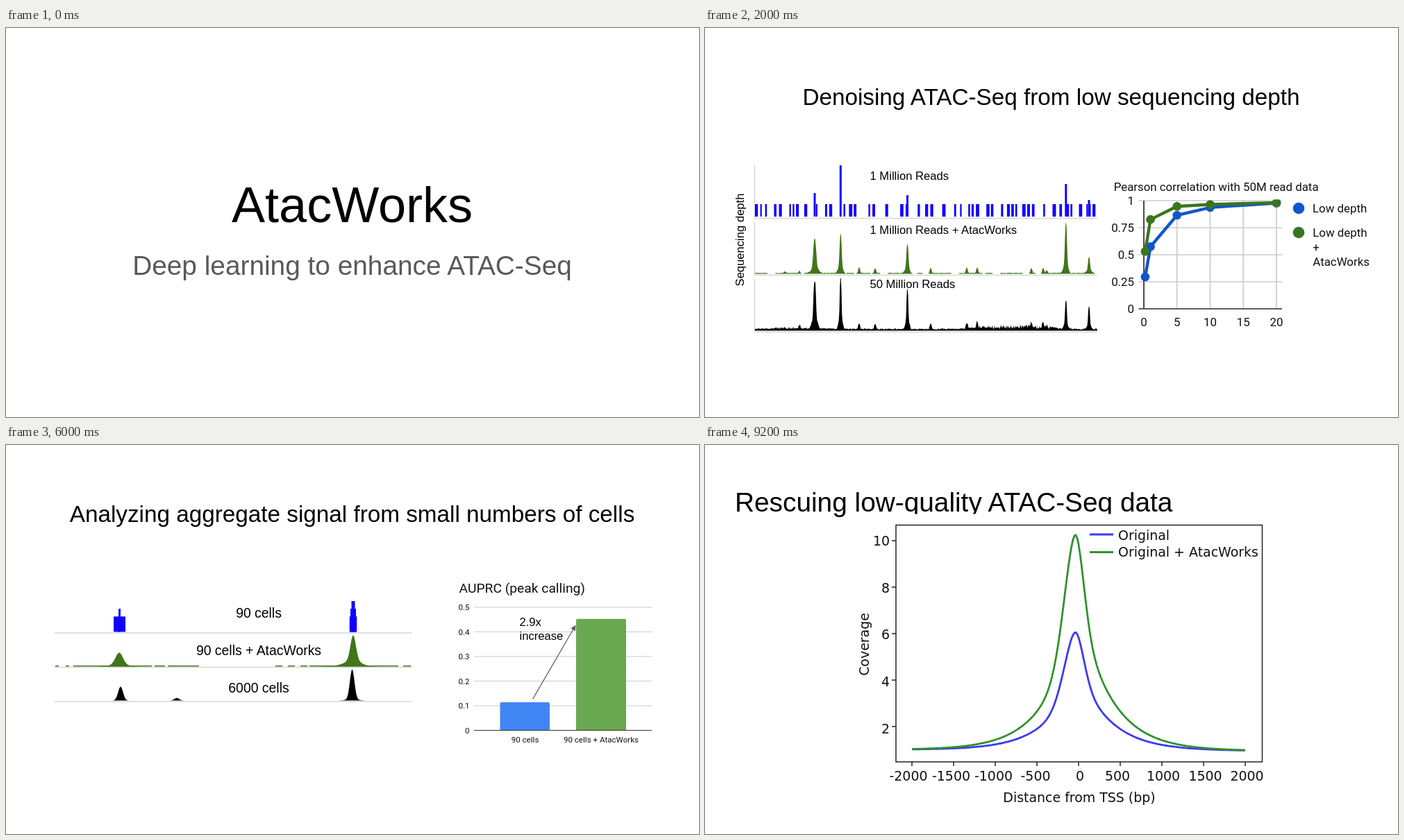
These frames come from a looping animation (998x561 px, 10 s). An HTML page:

```html
<!DOCTYPE html>
<html lang="en">
<head>
<meta charset="utf-8">
<title>AtacWorks</title>
<style>
html, body { margin: 0; width: 100%; height: 100%; overflow: hidden; background: #fff; }
svg { display: block; width: 998px; height: 561px; }
.arial { font-family: "Liberation Sans", Arial, sans-serif; }
.roboto { font-family: Roboto, sans-serif; }
.dejavu { font-family: "DejaVu Sans", sans-serif; }
</style>
</head>
<body>
<svg id="stage" viewBox="0 0 998 561" xmlns="http://www.w3.org/2000/svg"></svg>
<script>
const HOLD = 2000;
const BLUE = '#1100ff', GREEN = '#41751a', BLACK = '#000', RED = '#cc1a27';
const GRID = '#ccc', RULE = '#d6d8d8', AXIS = '#333', INK = '#111';
const DEPTHS = [0.2, 1, 5, 10, 20];

const tag = (name, attrs, body = '') =>
  `<${name} ${Object.entries(attrs).map(([k, v]) => `${k}="${v}"`).join(' ')}>${body}</${name}>`;
const rect = (x, y, w, h, fill, more = {}) => tag('rect', { x, y, width: w, height: h, fill, ...more });
const line = (x1, y1, x2, y2, stroke, width = 1.5, dash = 'none') =>
  tag('line', { x1, y1, x2, y2, stroke, 'stroke-width': width, 'stroke-dasharray': dash });
const dot = (cx, cy, r, fill) => tag('circle', { cx, cy, r, fill });
const write = (family, size, fill = INK) => (str, x, y, anchor = 'start', more = {}) =>
  tag('text', { class: family, x, y, 'font-size': size, fill, 'text-anchor': anchor, ...more }, str);
const turned = (x, y) => ({ transform: `translate(${x} ${y}) rotate(-90)` });
const each = (list, fn) => list.map(fn).join('');

const bigTitle = write('arial', 38.81, '#000');
const label = write('arial', 16.63, '#000');
const cellLabel = write('arial', 19.4, '#000');
const heading = str => write('arial', 33.27, '#000')(str, 498.5, 110.5, 'middle');

function seeded(seed) {
  return () => (seed = (seed * 16807) % 2147483647) / 2147483647;
}

// Filled signal: sum of peaks [centre, height, width] over a floor; a higher power flattens the tops.
function track(base, x0, x1, peaks, fill, { floor = () => 0, power = 2, step = 1 } = {}) {
  let d = `M${x0} ${base}`;
  for (let x = x0; x <= x1; x += step) {
    const h = peaks.reduce((sum, [c, top, w]) => sum + top * Math.exp(-(Math.abs((x - c) / w) ** power)), floor(x));
    d += `L${x} ${(base - h).toFixed(2)}`;
  }
  return tag('path', { d: d + `L${x1} ${base}Z`, fill });
}

// A narrow peak standing on a wider foot.
const spire = ([c, h, w]) => [[c, h * 0.8, w], [c, h * 0.2, w * 2.4]];

// Stacked blocks, one read count per level, centred on x.
const tower = (x, base, unit, widths) => each(widths, (w, i) =>
  rect(x - w / 2, base - unit * (i + 2), w, unit * (i + 2), BLUE));

// Line chart over sequencing depth 0..20.
function lineChart({ x0, xScale, yTop, yBase, yMax, yLabels, right, xText, yText, xDrop, yGap, r, sets }) {
  const px = v => x0 + v * xScale;
  const py = v => yBase - (v / yMax) * (yBase - yTop);
  const left = x0 - 7.5;
  const rows = yLabels.map((str, i) => [str, yTop + i * (yBase - yTop) / (yLabels.length - 1)]);
  return each(rows, ([str, y]) => line(left, y, right, y, GRID, 1.7) + yText(str, left - yGap, y + 5.8, 'end')) +
    each([0, 5, 10, 15, 20], v => line(px(v), yTop, px(v), yBase, GRID, 1.7) + xText(v, px(v), yBase + xDrop, 'middle')) +
    line(x0, yTop, x0, yBase, AXIS, 1.7) + line(left, yBase, right, yBase, AXIS, 1.7) +
    tag('svg', { y: yTop - 1.5, viewBox: `0 ${yTop - 1.5} 998 561`, width: 998, height: 561 },
      each(sets, ([color, values]) => {
        const points = values.map((v, i) => [px(DEPTHS[i]), py(v)]);
        return tag('polyline', { points: points.join(' '), fill: 'none', stroke: color, 'stroke-width': 4.4 }) +
          each(points, ([x, y]) => dot(x, y, r, color));
      }));
}

function titleSlide() {
  return write('arial', 72.08, '#000')('AtacWorks', 498.5, 280, 'middle') +
    write('arial', 38.81, '#595959')('Deep learning to enhance ATAC-Seq', 498.5, 356, 'middle');
}

// Sparse reads of equal height, scattered along the genome.
function scatteredReads(rand) {
  let out = '';
  for (let x = 72; x < 560;) {
    const w = 2 + rand() * 3;
    out += rect(x, 254, w, 18, BLUE);
    x += w + 2 + rand() ** 2 * 16;
  }
  return out;
}

function denoising() {
  const text = write('roboto', 16.85);
  const rand = seeded(41);
  const sites = [158, 195.3, 291.5, 519.8, 553];
  const peaks = (heights, width) => sites.map((x, i) => [x, heights[i], i ? width : width * 1.4]).flatMap(spire);
  const bumps = [115, 136, 222, 245, 325, 377, 392, 470, 487, 492].map(x => [x, 2 + rand() * 6, 1.8]);
  const greenFloor = x => (Math.sin(x * 0.31) + Math.sin(x * 0.117) > -0.6 ? 0.8 + rand() * 0.9 : 0);
  const hill = x => Math.exp(-(((x - 445) / 65) ** 4)) + 0.5 * Math.exp(-(((x - 130) / 45) ** 2));
  const blackFloor = x => 1.5 + rand() * 2 + hill(x) * (1 + 5 * rand() ** 2);

  return heading('Denoising ATAC-Seq from low sequencing depth') +
    each([274.5, 356.5, 438.5], y => line(71.5, y - 76, 71.5, y, '#c4c4c4', 1) + line(71, y, 565, y, RULE)) +
    scatteredReads(rand) +
    each([34, 74, 31, 47, 24], (h, i) => rect(sites[i] - 1.5, 272 - h, 3, h, BLUE)) +
    track(354.5, 72, 565, [...peaks([51, 58, 42, 74, 23], 1.9), ...bumps], GREEN,
      { floor: greenFloor, power: 2.5, step: 0.5 }) +
    track(436.5, 72, 565, [...peaks([68, 74, 58, 41, 32], 1.6), ...bumps], BLACK,
      { floor: blackFloor, power: 3.5, step: 0.75 }) +
    label('1 Million Reads', 237.5, 219) +
    label('1 Million Reads + AtacWorks', 237.5, 297) +
    label('50 Million Reads', 237.5, 375) +
    label('Sequencing depth', 0, 0, 'middle', turned(56, 305.5)) +
    text('Pearson correlation with 50M read data', 588.7, 235) +
    lineChart({
      x0: 632, xScale: 9.55, yTop: 249, yBase: 405, yMax: 1, yLabels: ['1', '0.75', '0.5', '0.25', '0'],
      right: 831, xText: text, yText: text, xDrop: 25, yGap: 6.5, r: 6.3,
      sets: [['#1155cc', [0.295, 0.575, 0.865, 0.937, 0.978]], ['#38761d', [0.53, 0.826, 0.947, 0.965, 0.981]]]
    }) +
    dot(855, 260, 8.3, '#1155cc') + dot(855, 295, 8.3, '#38761d') +
    text('Low depth', 875, 266) +
    each(['Low depth', '+', 'AtacWorks'], (str, i) => text(str, 875.3, 301 + i * 20.8));
}

function peakCalling() {
  const text = write('roboto', 18.4);
  const green = [[709.5, 37, 8.5], [727, 36, 8], [718, 9, 24], [819, 18, 9], [566, 2, 6], [670, 2.2, 18], [875, 1.8, 12]];
  const black = [[717, 41, 7.5], [706, 20, 6], [728, 12, 5], [748, 23, 9], [681, 8, 9]];
  const ripples = [540, 567, 592, 616, 638].map((x, i) => [x, i % 2 ? 8 : 5, 8]);
  const minor = [[817, 4.5, 6], [858, 6, 9], [887, 4.5, 9]];

  return heading('Better peak calling from low sequencing depth') +
    write('roboto', 27.3)('AUPRC (Peak calling)', 62.5, 215.5) +
    lineChart({
      x0: 103, xScale: 12.55, yTop: 237.5, yBase: 426, yMax: 0.8, yLabels: ['0.8', '0.6', '0.4', '0.2', '0'],
      right: 364, xText: text, yText: write('roboto', 15.6), xDrop: 27, yGap: 7, r: 6.9,
      sets: [['#1155cc', [0.034, 0.098, 0.278, 0.412, 0.586]], ['#6aa84f', [0.14, 0.312, 0.505, 0.607, 0.737]]]
    }) +
    dot(393, 249, 9, '#1155cc') + dot(393, 287, 9, '#6aa84f') +
    text('MACS2', 413.5, 255.5) + text('AtacWorks', 414, 293) +
    text('Sequencing Depth (x million', 229, 497.5, 'middle', { 'font-style': 'italic' }) +
    each([275, 291.5, 347.5, 364, 418.5, 436], y => line(528, y, 953, y, RULE)) +
    tower(709.5, 272.5, 12.1, [20, 9, 4.5]) + tower(726.5, 272.5, 12.1, [21, 15, 5.5]) +
    tower(819.5, 272.5, 12.1, [19, 13, 6.5]) +
    track(345.5, 528, 953, green, GREEN, { floor: () => 1.8 }) +
    rect(708, 349, 25, 12.5, RED) + rect(699.5, 421.5, 32.5, 12.5, RED) +
    track(417, 528, 764, [...black, ...ripples], BLACK, { floor: () => 0.7 }) +
    track(417, 806, 902, minor, BLACK, { floor: () => 0.6 }) +
    each([772, 928], x => rect(x, 416, 25, 1, BLACK)) +
    label('1 Million Reads', 524.5, 242) + label('1 Million Reads +', 524.5, 310) +
    label('AtacWorks', 524.5, 333) + label('50 Million Reads', 524.5, 402);
}

function smallCells() {
  const text = write('roboto', 11.6);
  const green = [[163, 17, 7.5], [163, 3, 16], [500, 36, 5.5], [500, 8, 15], [490, 1.5, 26]];
  const black = [[165, 20, 5], [246, 3.7, 5], [498.5, 43, 4.6], [498.5, 2, 11]];
  const barLabels = ['90 cells', '90 cells + AtacWorks'];
  return heading('Analyzing aggregate signal from small numbers of cells') +
    each([271, 320.5, 370], y => line(70, y, 585, y, RULE)) +
    tower(163.5, 269.5, 11.1, [17, 3]) + tower(500, 269.5, 11.1, [10.5, 8, 5]) +
    line(71, 318.7, 97, 318.7, GREEN, 1.5, '5 10') + line(97, 318.7, 278, 318.7, GREEN, 1.5, '113 4 15 4') +
    line(388, 318.7, 437, 318.7, GREEN, 1.5, '10 8') + line(437, 318.7, 583, 318.7, GREEN, 1.5, '128 7') +
    track(319.5, 110, 562, green, GREEN) + track(368.5, 140, 520, black, BLACK) +
    each(['90 cells', '90 cells + AtacWorks', '6000 cells'], (str, i) => cellLabel(str, 364, 249 + i * 54.2, 'middle')) +
    write('roboto', 19.25)('AUPRC (peak calling)', 652.5, 213) +
    each(['0.5', '0.4', '0.3', '0.2', '0.1', '0'], (str, i) => {
      const y = 234 + i * 35.5;
      return line(674, y, 930, y, GRID, 1.2) + text(str, 667.5, y + 4.2, 'end');
    }) +
    rect(711.5, 371, 71.5, 42, '#4285f4', { rx: 2 }) + rect(821, 250.8, 72, 162, '#6aa84f', { rx: 2 }) +
    rect(705, 411.5, 195, 3, '#fff') + line(674, 411.5, 930, 411.5, AXIS, 1.2) +
    each(barLabels, (str, i) => text(str, 747.5 + i * 109.5, 429, 'middle')) +
    line(758.5, 366.5, 818, 264, '#595959', 1.2) +
    tag('path', { d: 'M820 260.5L819.5 267.5L814.2 264.4Z', fill: '#595959', stroke: '#595959' }) +
    label('2.9x', 739.5, 261) + label('increase', 739.5, 281);
}

// Coverage around the start site: a narrow core on long exponential tails, steeper on the right.
function coverage(height, stroke) {
  const points = [];
  for (let x = 298; x <= 778; x += 2) {
    const dx = x - 533.5;
    const [share, core] = dx < 0 ? [0.54, 23] : [0.67, 17];
    const tail = Math.exp((6 - Math.hypot(dx, 6)) / 45);
    const shape = share * tail + (1 - share) * Math.exp(-((dx / core) ** 2));
    points.push(`${x},${(440.2 + dx / 300 - height * shape).toFixed(2)}`);
  }
  return tag('polyline', { points: points.join(' '), fill: 'none', stroke, 'stroke-width': 2.8 });
}

function rescuing() {
  const text = write('dejavu', 18.95);
  const blue = '#3a3af5', green = '#2f922f';
  const labelX = [293, 354.5, 415.5, 476, 540, 594, 660, 720.5, 780.5];
  return bigTitle('Rescuing low-quality ATAC-Seq data', 43, 95.5) +
    rect(213, 99.5, 600, 425, '#fff') +
    coverage(170, blue) + coverage(310.5, green) +
    rect(275, 115.5, 527.5, 341.5, 'none', { stroke: '#222', 'stroke-width': 1.5 }) +
    each(labelX, (x, i) => line(298 + i * 60, 457, 298 + i * 60, 463, '#222') +
      text((i - 4) * 500, x, 483.5, 'middle')) +
    each([10, 8, 6, 4, 2], (v, i) => line(269, 138 + i * 67, 275, 138 + i * 67, '#222') +
      text(v, 266, 145 + i * 67.7, 'end')) +
    text('Distance from TSS (bp)', 539, 515, 'middle') +
    text('Coverage', 0, 0, 'middle', turned(236, 287.5)) +
    each([['Original', blue], ['Original + AtacWorks', green]], ([str, color], i) =>
      line(554, 129 + i * 25.5, 588, 129 + i * 25.5, color, 3) + text(str, 595, 136.5 + i * 24));
}

const stage = document.getElementById('stage');
stage.innerHTML = each([titleSlide, denoising, peakCalling, smallCells, rescuing], slide => tag('g', {}, slide()));
const slides = [...stage.children];

function show(time) {
  const current = Math.floor(time / HOLD) % slides.length;
  slides.forEach((slide, i) => { slide.style.display = i === current ? '' : 'none'; });
}

const start = performance.now();
function tick(now) {
  show(Math.max(0, now - start));
  requestAnimationFrame(tick);
}
show(0);
requestAnimationFrame(tick);
</script>
</body>
</html>
```
